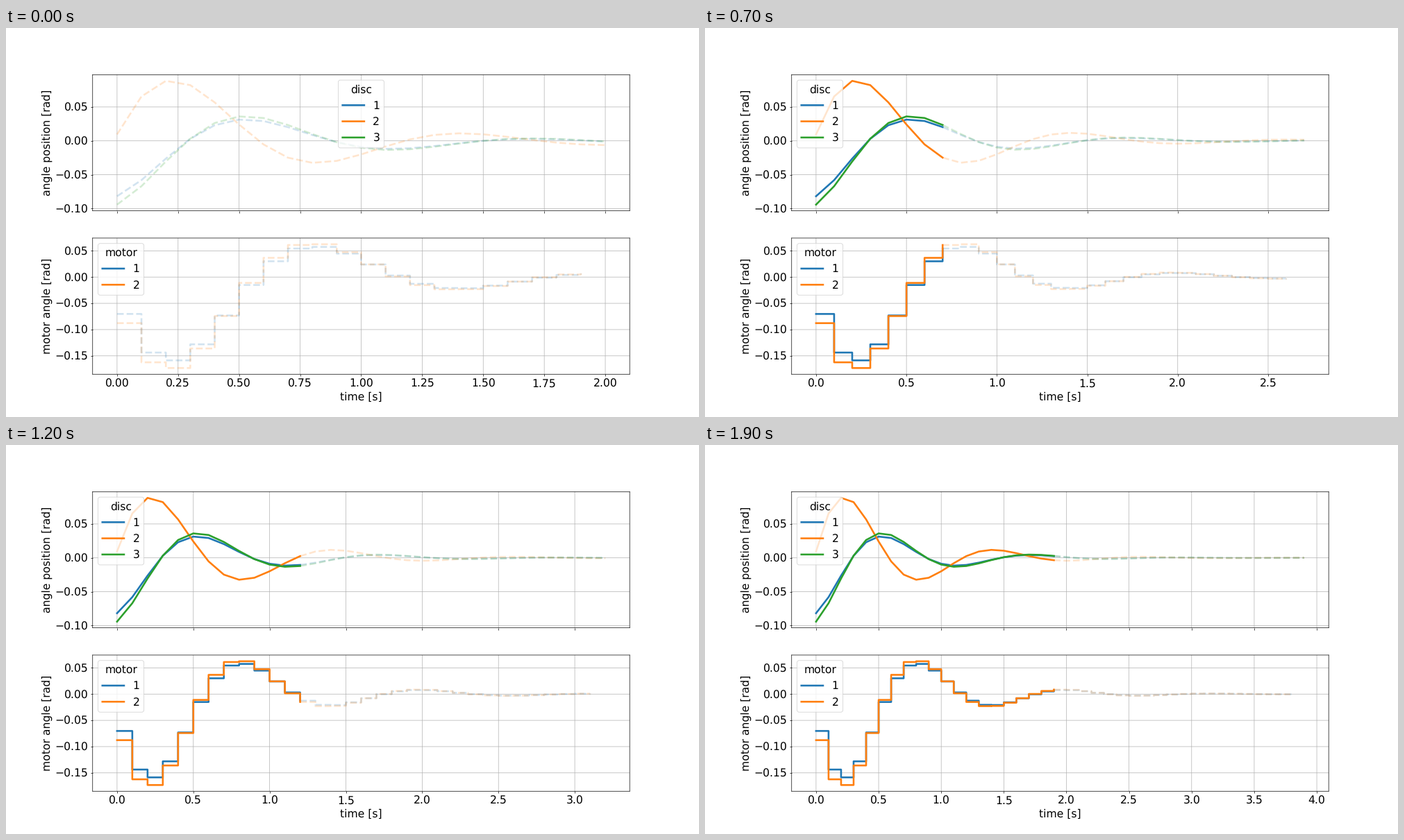
These frames come from a looping animation (998 px wide and 561 px high, 2 s). A matplotlib script:

```python
import numpy as np
import matplotlib.pyplot as plt
from matplotlib.animation import FuncAnimation

STEP = 0.1
HORIZON = 20
FRAMES = 20
DECAY = 0.843       # amplitude kept per time step
DISC_PERIOD = 1.186
MOTOR_PERIOD = 1.176
DISC_GAP = -0.002   # model error at the end of the first forecast
MOTOR_GAP = -0.0015

plt.rcParams.update({
    "font.family": "DejaVu Sans",
    "font.size": 18,
    "lines.linewidth": 3,
    "text.hinting": "none",
    "path.snap": False,
})


def swing(first, second, period):
    """Damped oscillation that starts with two given values."""
    x = [first, second]
    gain = 2 * DECAY * np.cos(2 * np.pi * STEP / period)
    while len(x) <= FRAMES + HORIZON:
        x.append(gain * x[-1] - DECAY**2 * x[-2])
    return np.array(x)


def forecast(x, k, count, gap):
    """The next values, drifting off slightly towards the horizon."""
    j = np.arange(count)
    fade = 0.8**k * np.cos(2 * np.pi * k * STEP / DISC_PERIOD)
    return x[k + j] + gap * fade * (j / HORIZON)**3


class Panel:
    def __init__(self, ax, series, count, gap, title, ylabel, **style):
        self.ax, self.series, self.count, self.gap = ax, series, count, gap
        self.past, self.future = [], []
        for i in range(len(series)):
            color = f"C{i}"
            self.past += ax.plot([], [], color=color, label=str(i + 1),
                                 **style)
            self.future += ax.plot([], [], "--", color=color, alpha=0.2,
                                   **style)
        ax.grid(True)
        ax.set_ylabel(ylabel)
        self.legend = ax.legend(title=title, loc="upper left")

    def show(self, k):
        for x, past, future in zip(self.series, self.past, self.future):
            past.set_data(np.arange(k + 1) * STEP, x[:k + 1])
            future.set_data((k + np.arange(self.count)) * STEP,
                            forecast(x, k, self.count, self.gap))
        self.ax.relim()


fig, (top, bottom) = plt.subplots(2, 1, sharex=True, figsize=(16, 8.994),
                                  dpi=62.375)

discs = [swing(-0.0818, -0.0580, DISC_PERIOD),
         swing(0.0095, 0.0655, DISC_PERIOD),
         swing(-0.0942, -0.0670, DISC_PERIOD)]
motors = [swing(-0.0702, -0.1437, MOTOR_PERIOD),
          swing(-0.0877, -0.1623, MOTOR_PERIOD)]

disc_panel = Panel(top, discs, HORIZON + 1, DISC_GAP,
                   "disc", "angle position [rad]")
motor_panel = Panel(bottom, motors, HORIZON, MOTOR_GAP,
                    "motor", "motor angle [rad]", drawstyle="steps-post")
panels = [disc_panel, motor_panel]
bottom.set_xlabel("time [s]")


def update(k):
    for panel in panels:
        panel.show(k)
    for panel in panels:
        panel.ax.autoscale_view()
    # the legend leaves the centre once the solid traces start
    disc_panel.legend.set_loc("upper left" if k else "upper center")
    return []


anim = FuncAnimation(fig, update, frames=FRAMES, init_func=lambda: update(0),
                     interval=100, repeat=True, repeat_delay=0, blit=False)
plt.show()
```
